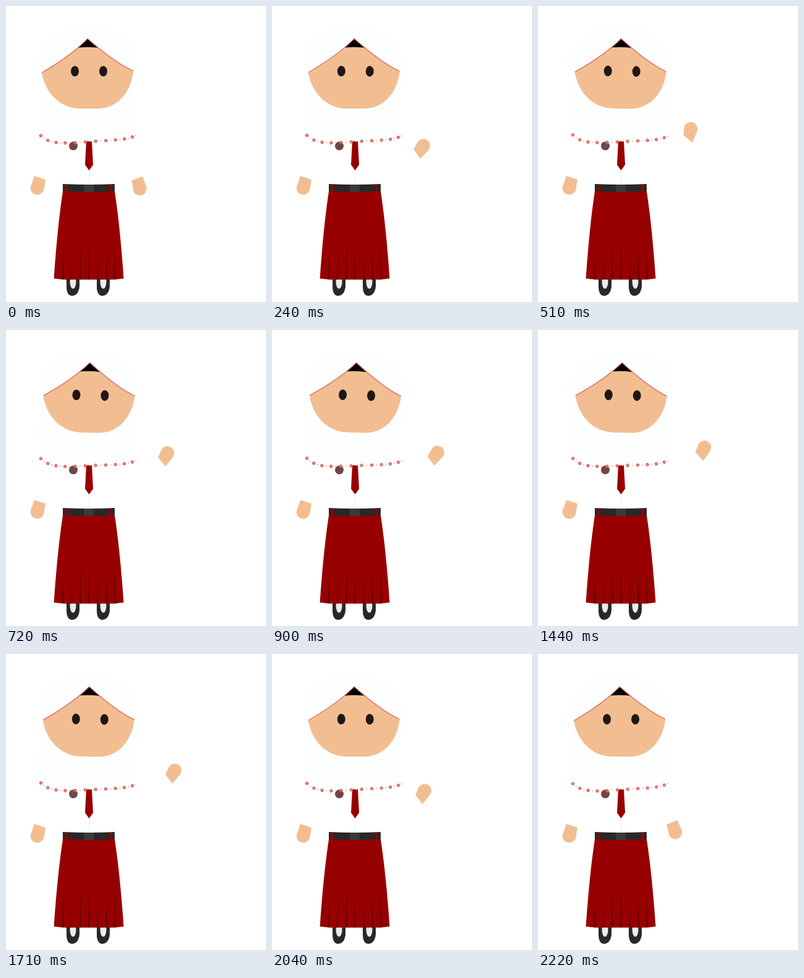
These frames come from a looping animation (421x479 px, 2250 ms). An HTML page with a canvas:

```html
<!DOCTYPE html>
<html>
<head>
<meta charset="utf-8">
<style>
html, body { margin: 0; width: 100%; height: 100%; overflow: hidden; background: #fff; }
canvas { display: block; }
</style>
</head>
<body>
<canvas id="stage" width="421" height="479"></canvas>
<script>
const ctx = document.getElementById('stage').getContext('2d');
const LOOP = 2250, STEP = 30, RAISE = 560, RAD = Math.PI / 180;
const SKIN = '#f2be91', RED = '#980000', BLACK = '#2a2728';

const mix = (a, b, u) => a + (b - a) * u;
const clamp = u => Math.max(0, Math.min(1, u));
const smooth = u => u * u * (3 - 2 * u);
const easeOut = u => Math.sin(clamp(u) * Math.PI / 2);

function fill(path, color) {
  ctx.fillStyle = color;
  ctx.fill(new Path2D(path));
}

function ellipse(x, y, rx, ry, color) {
  ctx.fillStyle = color;
  ctx.beginPath();
  ctx.ellipse(x, y, rx, ry, 0, 0, 2 * Math.PI);
  ctx.fill();
}

// A round palm joined to a straight cuff centred on x, y
function hand(x, y, cuff, angle) {
  const dx = -9.4 * Math.sin(cuff * RAD), dy = 9.4 * Math.cos(cuff * RAD);
  ctx.fillStyle = SKIN;
  ctx.beginPath();
  ctx.moveTo(x + dx, y + dy);
  ctx.arc(x + 17 * Math.cos(angle * RAD), y + 17 * Math.sin(angle * RAD), 11,
    (angle + 90) * RAD, (angle - 90) * RAD, true);
  ctx.lineTo(x - dx, y - dy);
  ctx.fill();
}

// The arm lifts, swings three times per loop while drifting up, and drops
function wavingHand(t) {
  const lift = easeOut(Math.min(t, LOOP - t) / RAISE);
  const turn = smooth(clamp(lift / 0.7));
  const swing = 0.5 - 0.5 * Math.cos(2 * Math.PI * (t - 480) / (LOOP / 3));
  const drift = clamp((t - 510) / 1200);
  hand(
    mix(212.5, 243 + 14.6 * easeOut(drift) + 7.4 * swing, lift),
    mix(279, 214.5 - 14 * drift + 2 * swing, lift),
    mix(72, -51 + 16 * swing, turn),
    mix(76, -75 + 24 * swing, turn));
}

function shoe(x) {
  ctx.save();
  ctx.translate(x, 0);
  fill('M0 440H21V454C20 464 15 469 9 469C3 469 0 463 0 454Z', BLACK);
  ellipse(10.5, 446, 5, 11.5, '#ececec');
  ctx.restore();
}

function body() {
  shoe(98);
  shoe(147);

  fill('M92 300H176Q184.5 355 190.5 441L176 442.7H93L77.5 441Q83.5 355 92 300Z', RED);
  const shade = ctx.createLinearGradient(0, 368, 0, 442);
  shade.addColorStop(0, '#8c0000');
  shade.addColorStop(1, '#580000');
  for (let i = 0; i < 7; i++) {
    const foot = 92 + 14.2 * i;
    fill(`M${94 + 13.5 * i} 368L${foot + 1} 442H${foot - 1.5}Z`, shade);
  }

  fill('M92 288Q134 290 176 288V300Q134 302 92 300Z', BLACK);
  fill('M126 289H142V301H126Z', '#3b3a3b');
  fill('M96 289H99L100.5 300H97Z M168 289H171L171.5 300H168.5Z', RED);
  fill('M134 266H135V289H134Z', '#ebebeb');
  fill('M130 219H139L141 257L134.5 266L128 257Z', RED);
  ellipse(109, 226.5, 7, 7, '#6f4744');
}

// Point on the scarf hem, u from -1 (left) to 1 (right)
function hem(u) {
  return [
    130.5 + 74 * Math.sin(0.85 * u) / Math.sin(0.85) - 2 * (1 - u * u),
    220 - 6 * u + 7 * u ** 3 - 9 * u ** 4
  ];
}

function flower(x, y) {
  for (let a = -90; a < 270; a += 72) {
    ellipse(x + 1.7 * Math.cos(a * RAD), y + 1.7 * Math.sin(a * RAD), 1.2, 1.2, '#db5a57');
  }
  ellipse(x, y, 0.7, 0.7, '#f3c5bd');
}

function head(angle) {
  ctx.save();
  ctx.translate(134, 211);
  ctx.rotate(angle);
  ctx.translate(-134, -211);

  fill('M54 207C66 170 50 130 52 90C56 50 90 34 132 34C174 34 208 50 210 90C212 130 200 170 210 207Q134 230 54 207Z', '#fdfefe');
  const veil = 'M58 108Q106 80 132 53Q178 93 206 105';
  fill(veil + 'C203 138 182 165 150 166H120C88 166 63 140 58 108Z', SKIN);
  fill('M132 53L149 67.5Q132 65.5 116.5 67.5Z', '#000');
  ctx.strokeStyle = '#d9605c';
  ctx.lineWidth = 1.1;
  ctx.stroke(new Path2D(veil));
  for (const x of [111.5, 157.5]) ellipse(x, 105.5, 6.5, 8.6, '#1f1716');

  for (let i = -5; i <= 5; i++) {
    flower(...hem(i / 5));
    ellipse(...hem((i + 0.5) / 5), 0.9, 0.9, '#c9a3a3');
  }
  ctx.restore();
}

function draw(now) {
  const t = Math.floor(now % LOOP / STEP) * STEP;
  ctx.fillStyle = '#fff';
  ctx.fillRect(0, 0, 421, 479);
  body();
  head(0.036 * (1 - Math.abs(1 - 2 * t / LOOP)));
  hand(55, 278, 108, 105);
  wavingHand(t);
  requestAnimationFrame(draw);
}
requestAnimationFrame(draw);
</script>
</body>
</html>
```
